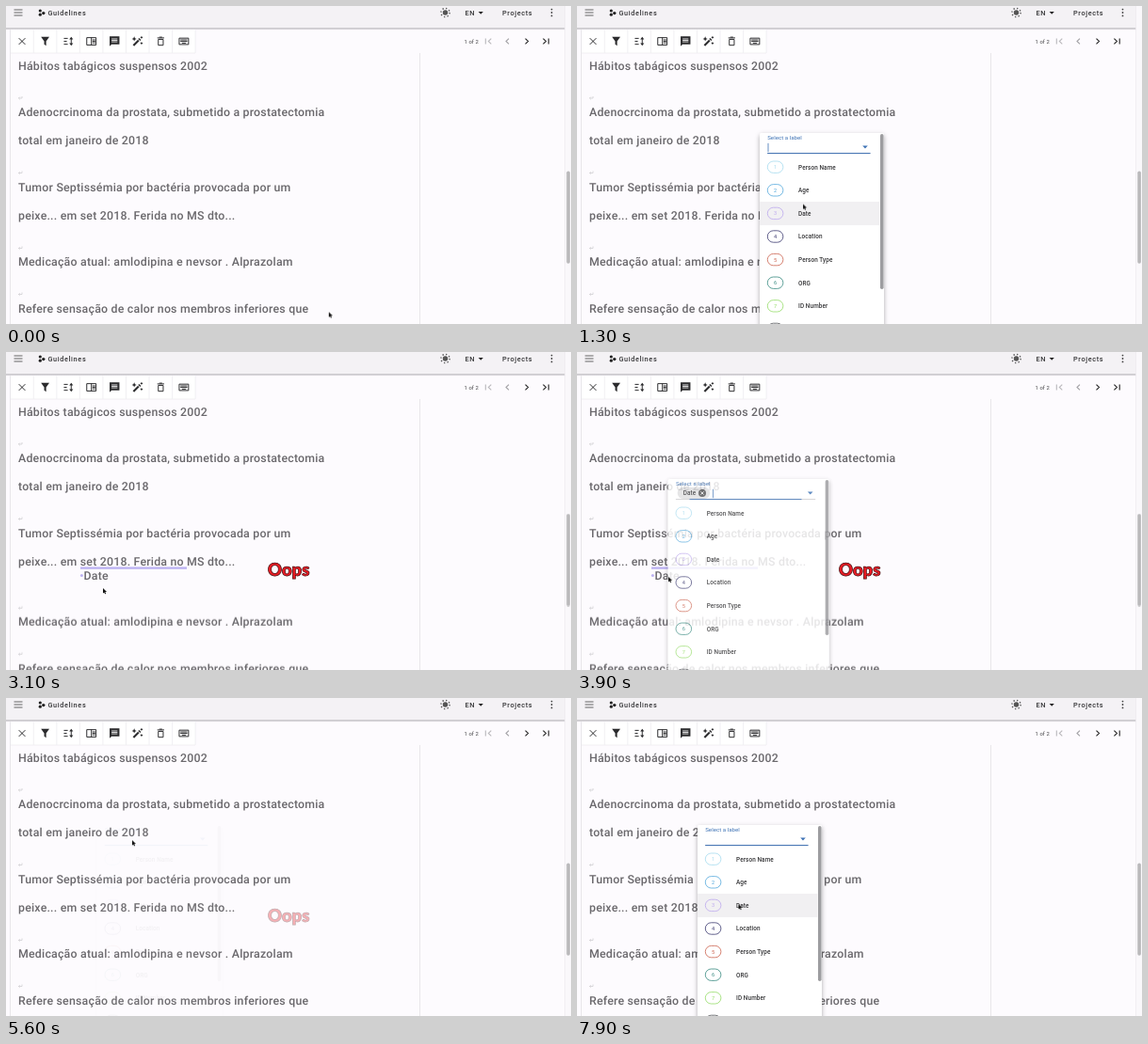
An HTML page for the animation above (8000 ms loop, 600 by 338 pixels).

```html
<!DOCTYPE html>
<html lang="pt">
<head>
<meta charset="utf-8">
<title>Text labelling</title>
<style>
html, body { margin: 0; width: 100%; height: 100%; overflow: hidden; background: #fdfbfe; }
svg { display: block; width: 100%; height: 100%; font-family: Roboto, sans-serif; }
.doc { font-size: 12.35px; font-weight: 500; letter-spacing: .0165em; fill: #6a686c; text-rendering: geometricPrecision; }
.bar { font-size: 7.3px; font-weight: 500; letter-spacing: .0892em; fill: #343436; }
.icon { fill: none; stroke: #2b2b2d; stroke-width: 1.9; }
.icon .solid { fill: #2b2b2d; stroke: none; }
.ret { fill: none; stroke: #c4c3c7; stroke-width: .6; }
.item { font-size: 6.4px; font-weight: 500; letter-spacing: .015em; fill: #363638; }
.badge { font-size: 5.6px; text-anchor: middle; }
.hint { font-size: 6.2px; fill: #3f73b5; }
.oops { font: 900 18.4px Lato, sans-serif; fill: #ec1c24; stroke: #4a1013; stroke-width: .75; }

/* one loop is 8 s, so 1% is 80 ms */
.anim { animation: 8s linear infinite; }
#cursor { animation-name: cursor; }
#mark { animation-name: mark; transform-origin: 79px 0; }
#lower { animation-name: lower; }
#thumb { animation-name: thumb; }
#entity { animation-name: entity; }
#oops { animation-name: oops; }
#menuA { animation-name: menuA; }
#menuB { animation-name: menuB; }
#menuB2 { animation-name: menuB2; }
#menuC { animation-name: menuC; }
#menuB .focus { animation: focus 8s linear infinite; transform-box: fill-box; transform-origin: center; }

@keyframes cursor {
  0% { transform: translate(343.5px, 325.5px); }
  5% { transform: translate(60px, 229px); }
  6.25% { transform: translate(79px, 222px); }
  11.25% { transform: translate(190px, 223px); }
  12.5% { transform: translate(192px, 222px); }
  16.25% { transform: translate(240px, 210.5px); }
  21.25%, 31.25% { transform: translate(248.5px, 217.5px); }
  35%, 36.25% { transform: translate(109px, 263px); }
  41.25%, 48.75% { transform: translate(97px, 239px); }
  57.5% { transform: translate(132px, 149px); }
  62%, 70% { transform: translate(134px, 151px); }
  80%, 81.25% { transform: translate(79px, 224px); }
  86.25% { transform: translate(126px, 225px); }
  88.75%, 90% { transform: translate(129px, 226px); }
  97.5%, 100% { transform: translate(171.5px, 219px); }
}
@keyframes mark {
  0%, 6.25% { transform: scaleX(0); }
  11.25%, 12.49% { transform: scaleX(1); }
  12.5%, 81.25% { transform: scaleX(0); }
  86.25% { transform: scaleX(.375); }
  87.5%, 91.24% { transform: scaleX(.44); }
  91.25%, 100% { transform: scaleX(0); }
}
@keyframes lower {
  0%, 19.99% { transform: none; }
  20%, 69.9% { transform: translateY(14.7px); }
  69.91%, 100% { transform: none; }
}
@keyframes thumb {
  0%, 19.99% { transform: none; }
  20%, 69.9% { transform: translateY(-3.5px); }
  69.91%, 100% { transform: none; }
}
@keyframes entity {
  0%, 19.99% { opacity: 0; }
  20%, 69.9% { opacity: 1; }
  69.91%, 100% { opacity: 0; }
}
@keyframes oops {
  0%, 22.5% { opacity: 0; }
  28.75%, 66.25% { opacity: 1; }
  71.9%, 100% { opacity: 0; }
}
@keyframes menuA {
  0%, 12.4% { opacity: 0; }
  15%, 18.75% { opacity: 1; }
  21.25%, 100% { opacity: 0; }
}
@keyframes menuB {
  0%, 46.9% { opacity: 0; }
  48.75% { opacity: .83; }
  50%, 63.74% { opacity: 1; }
  63.75%, 100% { opacity: 0; }
}
@keyframes menuB2 {
  0%, 63.74% { opacity: 0; }
  63.75%, 67.5% { opacity: 1; }
  70% { opacity: .05; }
  70.8%, 100% { opacity: 0; }
}
@keyframes menuC {
  0%, 91.2% { opacity: 0; }
  94%, 100% { opacity: 1; }
}
@keyframes focus {
  0%, 46.9% { transform: scaleX(0); }
  48.75% { transform: scaleX(.8); }
  50%, 100% { transform: scaleX(1); }
}
</style>
</head>
<body>
<svg viewBox="0 0 600 338">
  <defs>
    <filter id="shadow" x="-20%" y="-20%" width="140%" height="140%">
      <feDropShadow dx="0" dy="2" stdDeviation="2.4" flood-color="#000" flood-opacity=".32"/>
    </filter>
    <linearGradient id="edge" x2="0" y2="1">
      <stop stop-color="#d3d1d5"/>
      <stop offset=".5" stop-color="#c9c7cb"/>
      <stop offset="1" stop-color="#f3f1f4"/>
    </linearGradient>
    <path id="ret" class="ret" d="M17 -1.5V.5H13.4M14.8 -.9L13.4 .5L14.8 1.9"/>
  </defs>
  <rect width="600" height="338" fill="#fdfbfe"/>

  <!-- document -->
  <path d="M4.5 24V338M439.5 50V338" stroke="#e8e6ea" fill="none"/>
  <rect id="mark" class="anim" x="79" y="215" width="113" height="15" fill="#c5dcf6"/>
  <g class="doc">
    <text x="13" y="67.6">Hábitos tabágicos suspensos 2002</text>
    <text x="13" y="117">Adenocrcinoma da prostata, submetido a prostatectomia</text>
    <text x="13" y="147.2">total em janeiro de 2018</text>
    <text x="13" y="196.6">Tumor Septissémia por bactéria provocada por um</text>
    <text x="13" y="227">peixe... em set 2018. Ferida no MS dto...</text>
    <g id="lower" class="anim">
      <text x="13" y="276.4">Medicação atual: amlodipina e nevsor . Alprazolam</text>
      <text x="13" y="325.8">Refere sensação de calor nos membros inferiores que</text>
      <use href="#ret" y="257"/>
      <use href="#ret" y="306"/>
    </g>
    <g id="entity" class="anim">
      <rect x="79" y="228.4" width="113" height="2.4" fill="#bdb3f2"/>
      <circle cx="80.4" cy="237.5" r="1.5" fill="#bdb3f2"/>
      <text x="82.6" y="242">Date</text>
    </g>
  </g>
  <use href="#ret" y="97.5"/>
  <use href="#ret" y="177"/>

  <!-- app bar -->
  <rect width="600" height="23" fill="#f4f2f5"/>
  <rect y="23" width="600" height="2.4" fill="url(#edge)"/>
  <path d="M8.5 4H17.5M8.5 7H17.5M8.5 10H17.5" stroke="#666" stroke-width="1"/>
  <g fill="#222">
    <circle cx="36.3" cy="5" r="1.6"/><circle cx="36.3" cy="9.2" r="1.6"/><circle cx="39.8" cy="7.6" r="1.7"/>
  </g>
  <g class="bar">
    <text x="44.4" y="9.7">Guidelines</text>
    <text x="487.6" y="9.7">EN</text>
    <text x="527" y="9.7">Projects</text>
  </g>
  <path d="M501.6 6H506.8L504.2 8.8Z" fill="#222"/>
  <circle cx="466.5" cy="7" r="2.7" fill="#555"/>
  <circle cx="466.5" cy="7" r="4.6" fill="none" stroke="#555" stroke-width="1.4" stroke-dasharray="1.3 2.31"/>
  <g fill="#444"><circle cx="579.5" cy="3.6" r=".9"/><circle cx="579.5" cy="7" r=".9"/><circle cx="579.5" cy="10.4" r=".9"/></g>

  <!-- toolbar -->
  <rect x="5" y="25.4" width="196" height="24.6" fill="#fff"/>
  <path id="grid" fill="none" stroke="#eeecf0" stroke-width=".8"/>
  <g id="tools"></g>
  <text x="486.6" y="39.7" font-size="5.9" letter-spacing=".05" fill="#4a4a4c">1 of 2</text>
  <g fill="none" stroke-width="1.1">
    <path d="M509.3 34.5V40.5M515.3 34.7L512.3 37.5L515.3 40.3" stroke="#b9b8bc"/>
    <path d="M534 34.6L531 37.5L534 40.4" stroke="#a2a1a5"/>
    <path d="M551.5 34.6L554.5 37.5L551.5 40.4M570.4 34.6L573.4 37.5L570.4 40.4M576.2 34.5V40.5" stroke="#222"/>
  </g>

  <!-- page scrollbar -->
  <rect x="593.5" width="6.5" height="338" fill="#faf8fb"/>
  <path d="M593.5 0V338" stroke="#eceaee" stroke-width=".7"/>
  <rect id="thumb" class="anim" x="595.3" y="175.4" width="3.6" height="98.4" rx="1.8" fill="#bab9bb"/>

  <text id="oops" class="oops anim" x="278" y="237.6">Oops</text>
  <g id="menus"></g>
  <path id="cursor" class="anim" d="M0 0V5.5L1.3 4.4L2.1 6.3L3.1 5.9L2.3 4H4Z" fill="#111" stroke="#fff" stroke-width=".5" paint-order="stroke"/>
</svg>
<script>
const byId = id => document.getElementById(id);

// toolbar icons on a 24-unit grid
const icons = [
  '<path d="M5.5 5.5L18.5 18.5M18.5 5.5L5.5 18.5"/>',
  '<path class="solid" d="M3.5 3H20.5L14 12V21L10 18V12Z"/>',
  '<path d="M3 6H11M3 12H9M3 18H11M18 6V18"/><path class="solid" d="M14 8L18 3L22 8ZM14 16L18 21L22 16Z"/>',
  '<path d="M2.5 4.5H21.5V19.5H2.5ZM12 4.5V19.5M14 9H20M14 12H20M14 15H20"/>',
  '<path class="solid" d="M2 2H22V18H6L2 22Z"/><path d="M6 7H18M6 10H18M6 13H18" stroke="#fff" stroke-width="1.6"/>',
  '<path d="M3.5 20.5L14 10" stroke-width="4"/><path class="solid" d="M13 7L17 11L19 9L15 5ZM5 2L6.5 5.5L10 7L6.5 8.5L5 12L3.5 8.5L0 7L3.5 5.5ZM20 1L21 3L23 4L21 5L20 7L19 5L17 4L19 3ZM20 13L21 15L23 16L21 17L20 19L19 17L17 16L19 15Z"/>',
  '<path d="M7 8H17V20H7ZM5 5H19M9 3.5H15"/>',
  '<path d="M2.5 5.5H21.5V18.5H2.5ZM5 9H19M5 12H19M8 15.5H16"/>'
];
const step = 24.55;
byId('tools').innerHTML = icons.map((d, i) =>
  `<g class="icon" transform="translate(${17 + i * step - 6.2} 31.3) scale(.52)">${d}</g>`).join('');
byId('grid').setAttribute('d', icons.map((_, i) => `M${5 + (i + 1) * step - .3} 25.4V50`).join('') + 'M5 50H201');

const labels = [
  ['Person Name', '#a5dbef'], ['Age', '#55a9dc'], ['Date', '#bda9ee'], ['Location', '#3c3a70'],
  ['Person Type', '#cc6450'], ['ORG', '#36897f'], ['ID Number', '#95dc68'], ['Contact', '#55565a']
];

function row([name, color], i) {
  const y = 171.2 + i * 24.6;
  return `<rect x="8.3" y="${y - 6.2}" width="16.6" height="12.4" rx="6.2" fill="none" stroke="${color}" stroke-width=".8"/>
    <text class="badge" x="16.6" y="${y + 2}" fill="${color}">${i + 1}</text>
    <text class="item" x="41" y="${y + 2.3}">${name}</text>`;
}

const chip = `<rect x="10" y="143.8" width="34.5" height="12.2" rx="6.1" fill="#e0e0e1"/>
  <text class="item" x="16" y="152.2">Date</text>
  <circle cx="36.3" cy="150" r="4" fill="#58585a"/>
  <path d="M34.7 148.4L37.9 151.6M37.9 148.4L34.7 151.6" stroke="#eee" stroke-width=".9"/>`;

function menu(id, x, width, { hover, chosen, caret }) {
  const end = width - 14.5;
  const arrow = width - 20;
  return `<g id="${id}" class="anim"><g transform="translate(${x} 0)">
    <rect y="135" width="${width}" height="220" rx="2" fill="#fff" filter="url(#shadow)"/>
    ${hover ? `<rect y="208" width="${width - 4.5}" height="25" fill="#f1f0f2"/>` : ''}
    <text class="hint" x="8.2" y="142.3">Select a label</text>
    ${chosen ? chip : ''}
    <path d="M8.2 156.6H${end}" stroke="#a9a9ad" stroke-width=".6"/>
    <rect class="focus" x="8.2" y="156" width="${end - 8.2}" height="1.1" fill="#4a78b5"/>
    ${caret ? `<rect x="${caret}" y="145.8" width=".8" height="9.4" fill="#3f73b5"/>` : ''}
    <path d="M${arrow - 2.8} 148.6H${arrow + 2.8}L${arrow} 151.5Z" fill="#3f73b5"/>
    ${labels.map(row).join('')}
    <rect x="${width - 4}" y="136" width="3.6" height="165" rx="1.8" fill="#9d9da0"/>
  </g></g>`;
}

byId('menus').innerHTML =
  menu('menuA', 194, 132, { hover: true, caret: 8.6 }) +
  menu('menuB', 96.7, 171, { chosen: true, caret: 47.4 }) +
  menu('menuB2', 96.7, 132, {}) +
  menu('menuC', 128, 132, { hover: true });
</script>
</body>
</html>
```
